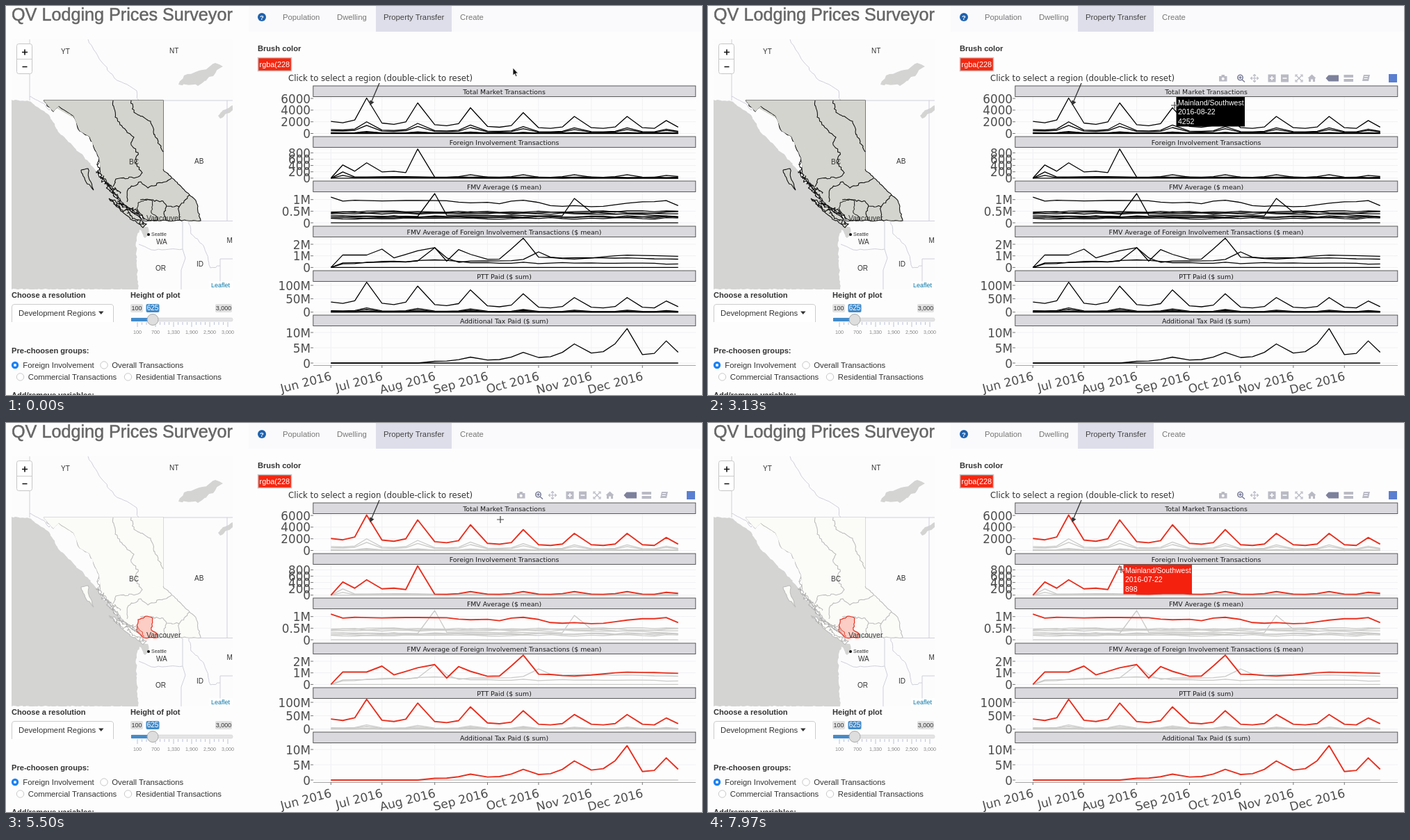
Write an HTML page that moves like this. It is 1001x560 px and loops after 8000 ms.

```html
<!DOCTYPE html>
<html lang="en">
<head>
<meta charset="utf-8">
<title>Housing dashboard</title>
<style>
html, body { margin: 0; width: 100%; height: 100%; overflow: hidden; background: #fdfdfe; }
svg { display: block; width: 1001px; height: 560px; }
text { font-family: "Liberation Sans", Arial, sans-serif; font-size: 11.3px; fill: #333; white-space: pre; }
.plot text { font-family: "DejaVu Sans", Verdana, sans-serif; }
.b { font-weight: bold; font-size: 11.1px; }
path, polyline { fill: none; }
.border { stroke: #cfcfda; }
.sea { fill: #d4d4d3; }
.bc { fill: #d4d4ce; stroke: #111; stroke-width: 1.1; }
.inner, .coast { stroke: #111; stroke-width: 1.1; stroke-linejoin: round; }
.main, .other { stroke: #000; stroke-width: 1.3; stroke-linejoin: round; }
.region { fill: none; stroke: #111; }
.sel .bc { fill: #fbfbf8; stroke: #bdbdbd; }
.sel .inner { stroke: #bdbdbd; }
.sel .coast { stroke: #a9a9a9; stroke-width: .9; }
.sel .other { stroke: #cacac8; }
.sel .main { stroke: #e8301f; stroke-width: 1.9; }
.sel .region { fill: #fbcdc4; stroke: #e4311f; stroke-width: 1.2; }
.sel .shore { stroke: #e4311f; }
.tip rect { fill: #000; }
.tip text { fill: #fff; font-size: 10.5px; }
.sel .tip rect { fill: #f5210f; }
</style>
</head>
<body>
<svg id="stage" viewBox="0 0 1001 560"></svg>
<script>
const stage = document.getElementById('stage');
const NS = 'http://www.w3.org/2000/svg';
const LOOP = 8000, CLICK = 3300;

let seed = 7;
function rand() {
  seed = (seed * 16807) % 2147483647;
  return seed / 2147483647;
}
const wob = a => (rand() - 0.5) * 2 * a;

function el(tag, attrs = {}, parent = stage) {
  const e = document.createElementNS(NS, tag);
  for (const k in attrs) e.setAttribute(k, attrs[k]);
  parent.appendChild(e);
  return e;
}
function text(x, y, s, attrs = {}, parent = stage) {
  const e = el('text', { x, y, ...attrs }, parent);
  e.textContent = s;
  return e;
}
const path = (d, attrs, parent) => el('path', { d, ...attrs }, parent);
const rect = (x, y, width, height, attrs, parent) => el('rect', { x, y, width, height, ...attrs }, parent);
const circle = (cx, cy, r, attrs, parent) => el('circle', { cx, cy, r, ...attrs }, parent);

// Breaks the segments of a coarse line into small random steps.
function jag(points, amp, step = 3) {
  const p = points.split(' ').map(q => q.split(',').map(Number));
  const out = [p[0]];
  for (let i = 1; i < p.length; i++) {
    const [x0, y0] = p[i - 1], [x1, y1] = p[i];
    const n = Math.max(1, Math.round(Math.hypot(x1 - x0, y1 - y0) / step));
    for (let j = 1; j <= n; j++) {
      const k = j / n, a = j < n ? amp : 0;
      out.push([x0 + (x1 - x0) * k + wob(a), y0 + (y1 - y0) * k + wob(a)]);
    }
  }
  return 'M' + out.map(q => q.map(v => v.toFixed(1)).join(',')).join('L');
}

function drawMap() {
  const clip = el('clipPath', { id: 'mapClip' }, el('defs'));
  rect(8, 48, 318, 360, {}, clip);
  const g = el('g', { 'clip-path': 'url(#mapClip)' });
  const rough = (points, amp, cls, step) => path(jag(points, amp, step), { class: cls }, g);
  rect(8, 48, 318, 360, { fill: '#fcfcfd' }, g);

  rough('8,135 33,137 62,157 75,181 117,222 160,277 196,318 204,318 206,330 200,334 192,322 187,340 190,408 8,408', 1, 'sea');
  rough('248,113 261,98 282,92 301,82 312,87 298,101 276,115 248,113', 2, 'sea', 5);
  rough('305,158 312,150 326,143 326,150 308,162', .8, 'sea');

  path('M34,48V136M226,136H326M318,136V309.500M280,309.500H326M254,310V350M254,350L258,363L252,380V408M326,364H308V408', { class: 'border' }, g);
  rough('118,48 134,76 156,104 188,122 191,136', 2, 'border', 5);
  rough('191,343 209,351 254,350', .8, 'border', 5);
  rough('263,310 266,328 284,345 294,377 308,374', 1.4, 'border', 4);
  rough('34,130 54,140 62,150 74,141 88,150', 1, 'border');

  rough('54,136 226,136 226,235', 0, 'bc');
  rough('226,235 250,258 273,280 280,309 205,309 170,287 137,246 134,219 120,188 106,180 97,158 76,144 68,152 54,136', 1, 'bc');
  path('M54,136H226V235L137,246L134,219L120,188L106,180L97,158L76,144L68,152Z', { class: 'bc', style: 'stroke:none' }, g);
  rough('108,236 118,234 119,247 126,265 115,253 108,236', 1, 'bc');
  rough('148,277 176,290 202,314 197,319 165,295 148,277', 1.5, 'bc');

  ['154,136 157,160 168,175 184,189 180,200 190,211 186,225 196,240 190,246 158,249 154,260',
    '180,136 184,153 208,166 212,181 226,210', '174,282 176,263 194,253 204,262 238,248',
    '193,279 226,281 231,288 249,289 264,272', '231,288 227,299 231,309', '249,289 250,309'
  ].forEach(p => rough(p, 1.4, 'inner'));
  path(jag('188,300 190,283 203,278 211,281 209,298 216,302 218,309 198,309 188,300', .9) + 'Z', { class: 'region' }, g);
  ['134,222 132,238 152,264 168,288 194,304', '130,238 158,276', '146,254 164,270',
    '164,284 190,297', '150,279 198,315'
  ].forEach(p => rough(p, 2.8, 'coast', 1.8));
  rough('189,293 199,307', 1.8, 'coast shore', 1.8);

  const label = (x, y, s, size = 10) => text(x, y, s, { style: `font-size:${size}px` }, g);
  label(79, 69, 'YT');
  label(235, 68, 'NT');
  label(177, 228, 'BC');
  label(271, 227, 'AB');
  label(216, 343, 'WA');
  label(215, 381, 'OR');
  label(274, 375, 'ID');
  label(317.500, 341, 'M');
  label(202, 309, 'Vancouver', 10.500);
  label(209, 331, 'Seattle', 7);
  circle(205, 329, 2, { fill: '#111' }, g);
  rect(292, 396, 34, 12, { fill: '#fff', opacity: .7 }, g);
  text(295, 405, 'Leaflet', { style: 'font-size:9px;fill:#0878a8' }, g);

  rect(15.500, 54.500, 22, 43, { rx: 3, fill: '#fff', stroke: '#c6c6c6' });
  path('M16,76.500H37', { stroke: '#ccc' });
  path('M23,66.500H31M27,62.500V70.500M23.500,87.500H30.500', { stroke: '#111', 'stroke-width': 1.6 });
}

function drawSlider() {
  const pill = (x, w, s, size, fill, color) => {
    rect(x, 429, w, 12, { rx: 2, fill });
    text(x + w / 2, 438.300, s, { 'text-anchor': 'middle', style: `font-size:${size}px;fill:${color}` });
  };
  rect(180, 449, 146, 5, { rx: 2, fill: '#e4e4e6', stroke: '#d0d0d0', 'stroke-width': .6 });
  rect(180, 449, 31, 5, { fill: '#428bca' });
  pill(179, 18, '100', 9, '#e1e1e1', '#333');
  pill(301, 24, '3,000', 9, '#e1e1e1', '#333');
  pill(201.500, 19, '625', 10, '#428bca', '#fff');
  for (let i = 0; i <= 20; i++) path(`M${189 + i * 6.500},455V${i % 4 ? 459 : 462}`, { stroke: '#a9b3d0', 'stroke-width': .8 });
  circle(211, 451.500, 8, { fill: '#dedede', stroke: '#aaa' });
  ['100', '700', '1,330', '1,900', '2,500', '3,000'].forEach((s, i) =>
    text(189 + i * 26, 471.500, s, { 'text-anchor': 'middle', style: 'font-size:7.2px;fill:#888' }));
}

function drawControls() {
  text(8, 21, 'QV Lodging Prices Surveyor', { style: 'font-size:25.2px;fill:#666;stroke:#666;stroke-width:.5px' });
  text(8, 420, 'Choose a resolution', { class: 'b' });
  text(179, 420, 'Height of plot', { class: 'b' });
  path('M8.500,455V433Q8.500,429.500 12,429.500H150Q154.500,429.500 154.500,433V455', { stroke: '#ccc', style: 'fill:#fff' });
  text(18, 446, 'Development Regions');
  path('M133,439.500H140.500L136.750,444Z', { style: 'fill:#333' });
  drawSlider();

  text(8, 500, 'Pre-choosen groups:', { class: 'b' });
  const radio = (x, y, s, on) => {
    circle(x, y, 5.200, on ? { fill: '#1b82f2' } : { fill: '#fff', stroke: '#bbb', 'stroke-width': .8 });
    circle(x, y, 2, { fill: '#fff' });
    text(x + 11.300, y + 4, s);
  };
  radio(13, 517, 'Foreign Involvement', true);
  radio(141, 517, 'Overall Transactions');
  radio(20.500, 534, 'Commercial Transactions');
  radio(175.500, 534, 'Residential Transactions');
  text(8, 564, 'Add/remove variables:', { class: 'b' });

  rect(349, 0, 652, 37, { fill: '#fafafc' });
  rect(532, 0, 109, 37, { fill: '#dedeea' });
  circle(368, 16, 6, { fill: '#1f62ad' });
  text(368, 19.500, '?', { 'text-anchor': 'middle', class: 'b', style: 'font-size:9.5px;fill:#fff' });
  const tab = (x, s, fill = '#777') => text(x, 20, s, { style: `fill:${fill}` });
  tab(398, 'Population');
  tab(476, 'Dwelling');
  tab(543, 'Property Transfer', '#444');
  tab(653, 'Create');
  text(362, 65, 'Brush color', { class: 'b' });
  rect(362.500, 74.500, 48, 19, { fill: '#f5260f', stroke: '#c4c4c4', 'stroke-width': 1.5 });
  text(364.500, 88, 'rgba(228', { style: 'font-size:10.9px;fill:#fff' });
}

// Four dates a month: the 1st, 8th, 15th and 22nd.
const MONTHS = ['Jun', 'Jul', 'Aug', 'Sep', 'Oct', 'Nov', 'Dec'];
const dayX = (month, day) => 467.300 + 2.448 * ((Date.UTC(2016, 5 + month, day) - Date.UTC(2016, 5, 1)) / 864e5);
const XS = Array.from({ length: 28 }, (_, i) => dayX(i >> 2, 1 + 7 * (i % 4)));

// Series hold heights in pixels above the zero line of their panel.
const scale = (s, k) => s.map(h => h * k);
const flat = (h, amp) => XS.map(() => h + wob(amp));

// Sales climb towards the end of each month; in December a week early.
function monthly(first, second, third, peak) {
  return XS.map((_, i) => {
    const m = i >> 2, late = m === 6 ? [.76, .37] : [third, 1];
    return [first, second, ...late][i % 4] * peak(m);
  });
}
// Straight lines between "index:height" points, with a little noise.
function trace(points, amp = 0.4) {
  const p = points.split(' ').map(q => q.split(':').map(Number));
  return XS.map((_, i) => {
    const j = Math.max(1, p.findIndex(q => q[0] >= i));
    const [i0, h0] = p[j - 1], [i1, h1] = p[j];
    return h0 + (h1 - h0) * (i - i0) / (i1 - i0) + (i ? wob(amp) : 0);
  });
}

function panels() {
  const total = monthly(.34, .3, .38, m => Math.max(24.500, 51 - 7 * m));
  const surge = trace('0:0 1:19 2:10 3:22 4:9 5:10 6:8 7:42 8:1 27:1', 0);
  const calm = monthly(.1, .05, .3, m => m < 2 ? 0 : 4);
  const ptt = monthly(.34, .29, .38, m => Math.max(21, 43 - 5.500 * m));
  const tax = monthly(.29, .33, .56, m => m < 2 ? 0 : Math.min(42 + (m === 5) * 9, 8.500 * 1.8 ** (m - 2)));
  return [
    { title: 'Total Market Transactions', step: 16.800, labels: [0, 2000, 4000, 6000],
      main: total, others: [.33, .23, .055, .035, .012].map(k => scale(total, k)) },
    { title: 'Foreign Involvement Transactions', step: 9.100, labels: [0, 200, 400, 600, 800],
      main: surge.map((h, i) => h + calm[i]), others: [trace('0:0 1:9 2:2 27:1'), trace('0:0 1:4 2:1 27:0')] },
    { title: 'FMV Average ($ mean)', step: 16.700, labels: [0, '0.5M', '1M'],
      main: trace('0:37 1:32 7:32.5 13:28 15:33 17:24.5 21:24 26:33 27:25', 1),
      others: [trace('0:10 7:9 8:42 9:11 18:10 19:35 20:15 27:9'), ...[16, 15, 13.500, 9, 8, 6.500].map(h => flat(h, 1.300))] },
    { title: 'FMV Average of Foreign Involvement Transactions ($ mean)', step: 16.700, labels: [0, '1M', '2M'],
      main: trace('0:0 1:18 3:18 4:26 5:14 8:29 9:9 10:26 12:12 13:12 15:42 16:15 19:12 23:18 27:16'),
      others: [trace('0:0 1:7 7:9 8:28 9:14 10:8 15:11 16:23 17:14 27:12', 1), trace('0:0 1:5 8:10 12:7 27:5', 1)] },
    { title: 'PTT Paid ($ sum)', step: 19.300, labels: [0, '50M', '100M'],
      main: ptt, others: [.14, .085, .03, .015].map(k => scale(ptt, k)) },
    { title: 'Additional Tax Paid ($ sum)', step: 22, labels: [0, '5M', '10M'], main: tax, others: [] }
  ];
}

function drawPlots() {
  const g = el('g', { class: 'plot' });
  text(406, 107.500, 'Click to select a region (double-click to reset)', { style: 'font-size:11.7px;fill:#333' }, g);
  panels().forEach((p, n) => {
    const top = n ? Math.round(188 + 64.300 * (n - 1)) : 115;
    const zero = n < 5 ? 183.500 + 64.300 * n : 514;
    const line = (s, cls) => el('polyline', {
      class: cls, points: s.map((h, i) => XS[i].toFixed(1) + ',' + (zero - h).toFixed(1)).join(' ')
    }, g);
    MONTHS.forEach((_, m) => path(`M${dayX(m, 1)},${top + 16}V${zero + 2}`, { stroke: '#f1f1f3' }, g));
    p.labels.forEach((s, i) => {
      const y = zero - i * p.step;
      path(`M442,${y}H992`, { stroke: '#f1f1f3' }, g);
      path(`M438,${y}H442`, { stroke: '#777' }, g);
      text(438, y + 6.500, s, { 'text-anchor': 'end', style: 'font-size:16.8px;fill:#4d4d4d' }, g);
    });
    rect(441.800, top, 550, 15.500, { fill: '#d9d9de', stroke: '#4a4a4a', 'stroke-width': .9 }, g);
    text(716.500, top + 11.700, p.title, { 'text-anchor': 'middle', style: 'font-size:9.4px;fill:#1a1a1a' }, g);
    line(flat(0, 0), 'other');
    p.others.forEach(s => line(s, 'other'));
    line(p.main, 'main');
  });
  path('M442,517.500H992', { stroke: '#a5a5a5' }, g);
  MONTHS.forEach((name, m) => {
    const x = dayX(m, 1);
    path(`M${x},517V521`, { stroke: '#777' }, g);
    text(0, 0, name + ' 2016', {
      'text-anchor': 'end', transform: `translate(${x + 2},538) rotate(-14.5)`, style: 'font-size:17px;fill:#4d4d4d'
    }, g);
  });
  path('M537,111L525,139', { stroke: '#333', 'stroke-width': 1.3 }, g);
  path('M523.500,143L523,135.500L529.500,138.500Z', { style: 'fill:#333' }, g);
}

function drawToolbar() {
  const dark = '#7d819b', pale = '#b9bac4';
  const g = el('g', { stroke: pale, 'stroke-width': 1.6 });
  const block = (x, y, w, h, fill = pale) => rect(x, y, w, h, { fill, stroke: 'none' }, g);
  const solid = (d, fill = pale) => path(d, { style: `fill:${fill}`, stroke: 'none' }, g);
  block(735, 101, 11.500, 7.500);
  block(738.500, 99, 4.500, 3);
  circle(740.700, 104.700, 2, { fill: '#fff', stroke: 'none' }, g);
  circle(765.500, 103, 3.700, { fill: 'none', stroke: dark }, g);
  path('M768,106L772,109.500M763.500,103H767.500M765.500,101V105', { stroke: dark }, g);
  for (let a = 0; a < 360; a += 90) {
    path('M786,104V98.500M784,100.500L786,98.500L788,100.500', { transform: `rotate(${a} 786 104)`, 'stroke-width': 1.1 }, g);
    path('M850,104L854,100M852,99H855V102', { transform: `rotate(${a} 850 104)`, 'stroke-width': 1.2 }, g);
  }
  block(805.500, 98.500, 11, 11);
  block(824, 98.500, 11, 11);
  path('M808,104H814M811,101V107M826.500,104H832.500', { stroke: '#fff' }, g);
  solid('M862.500,104L868.500,98.500L874.500,104H873V109H870V105.500H867V109H864V104Z');
  solid('M888.500,104L892.500,99.500H907V108.500H892.500Z', dark);
  block(914.500, 99, 13.500, 4);
  block(914.500, 105, 13.500, 4);
  solid('M943,99H952L950,108H941Z');
  path('M944,101.500H949M943.500,104.500H948.500', { stroke: '#fff', 'stroke-width': 1 }, g);
  block(979, 98, 12, 12, '#5a7fd0');
  return g;
}

function makeTip(x, y, lines) {
  const g = el('g', { class: 'tip', transform: `translate(${x},${y})` });
  rect(0, 0, 98.500, 42.500, {}, g);
  lines.forEach((s, i) => text(2.500, 11.700 + i * 13.500, s, {}, g));
  return { g, near: (px, py) => Math.hypot(px - x + 4, py - y - 9) < 15 };
}

drawMap();
drawControls();
drawPlots();
const toolbar = drawToolbar();
const tips = [
  makeTip(673.500, 131, ['Mainland/Southwest', '2016-08-22', '4252']),
  makeTip(597.500, 204, ['Mainland/Southwest', '2016-07-22', '898'])
];
const arrow = path('M0,0V11L2.500,8.700L4.200,12.500L6,11.700L4.300,8H7.500Z', { stroke: '#fff', 'stroke-width': .8, style: 'fill:#111' });
const cross = el('g');
path('M-5.500,0H5.500M0,-5.500V5.500', { stroke: '#fff', 'stroke-width': 3, opacity: .6 }, cross);
path('M-5,0H5M0,-5V5', { stroke: '#444', 'stroke-width': 1.2 }, cross);

// Pointer moves: start time, end time, x, y
const MOVES = [[900, 1550, 671, 143], [4450, 5300, 711, 139], [5600, 6300, 633, 209], [6800, 7500, 594, 211]];
function pointer(t) {
  let x = 729, y = 89;
  for (const [from, to, x1, y1] of MOVES) {
    const k = Math.min(1, Math.max(0, (t - from) / (to - from)));
    const e = k * k * (3 - 2 * k);
    x += (x1 - x) * e;
    y += (y1 - y) * e;
  }
  return [x, y];
}
const show = (e, on) => e.setAttribute('visibility', on ? 'visible' : 'hidden');

function render(t) {
  const [x, y] = pointer(t);
  const inPanel = (y > 131 && y < 187) || y > 203;
  stage.classList.toggle('sel', t >= CLICK);
  show(toolbar, y > 97);
  show(arrow, !inPanel);
  show(cross, inPanel);
  for (const e of [arrow, cross]) e.setAttribute('transform', `translate(${x.toFixed(1)},${y.toFixed(1)})`);
  for (const tip of tips) show(tip.g, tip.near(x, y));
}

const begin = performance.now();
function tick() {
  render((performance.now() - begin) % LOOP);
  requestAnimationFrame(tick);
}
tick();
</script>
</body>
</html>
```
